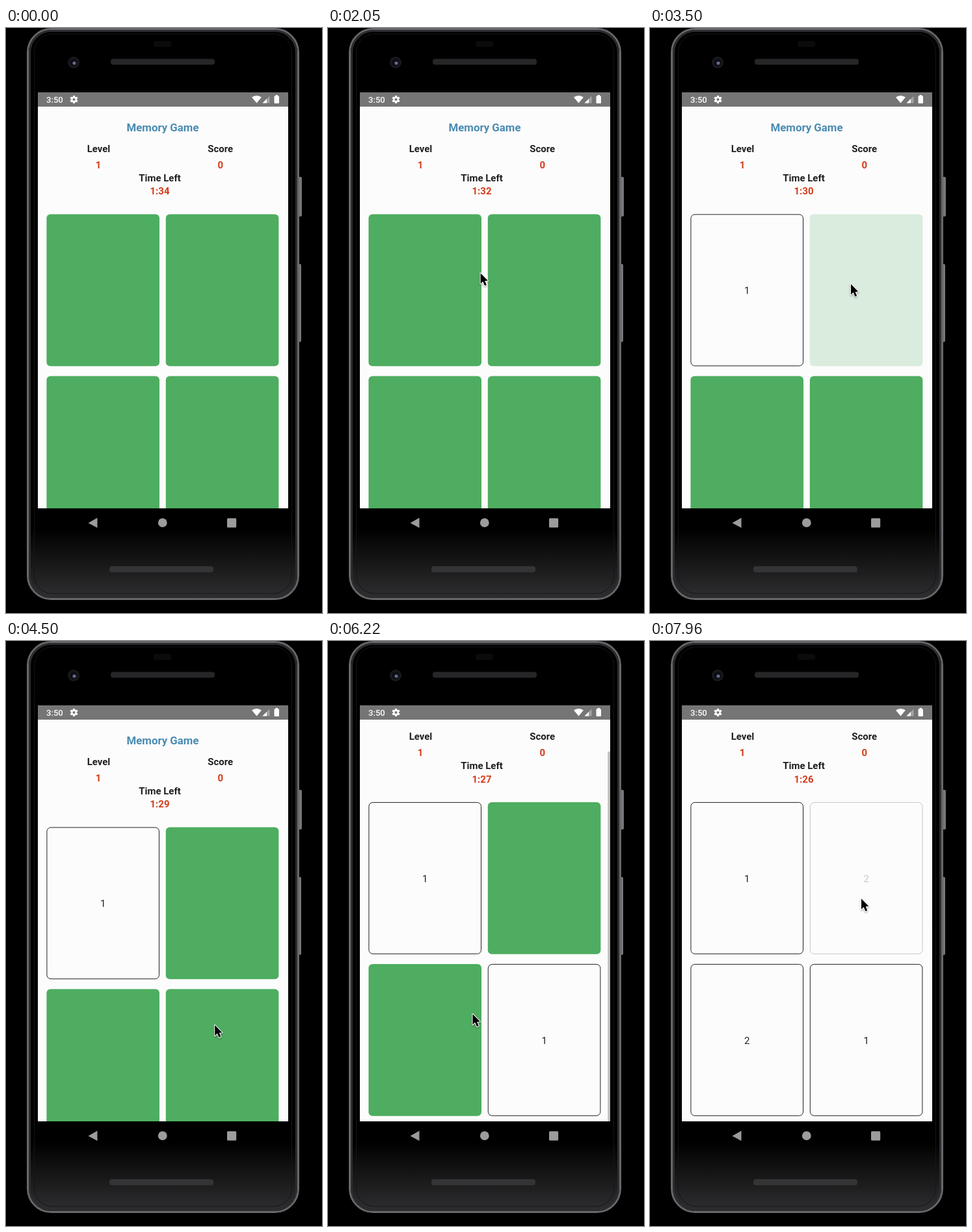
Animation of 486 by 900 pixels, one loop 8000 ms. Source, as an HTML page with a canvas:

```html
<!DOCTYPE html>
<html lang="en">
<head>
<meta charset="utf-8">
<title>Memory Game</title>
<style>
  html, body { margin: 0; width: 100%; height: 100%; overflow: hidden; background: #000; }
  canvas { display: block; }
</style>
</head>
<body>
<canvas id="stage" width="486" height="900"></canvas>
<script>
const ctx = document.getElementById('stage').getContext('2d');
const LOOP = 8000;
const PAPER = '#fdfcfc', INK = '#202022', RED = '#d23c1a', NAV = '#9c9c9c', BAR = '#757575';
const GREEN = [78, 173, 96], PRESSED = [217, 236, 222];
const VIEW = { x: 49, y: 134, w: 385, h: 605 };
const MAX_SCROLL = 38.5;

const CARDS = [
  { x: 62.4, y: 286.4, n: 1 }, { x: 245.8, y: 286.4, n: 2 },
  { x: 62.4, y: 535.4, n: 2 }, { x: 245.8, y: 535.4, n: 1 }
];
// Each tap: card, press, reveal and hide times
const TAPS = [
  { card: 0, press: 2640, reveal: 2800, hide: Infinity },
  { card: 1, press: 3400, reveal: 3540, hide: 4280 },
  { card: 3, press: 4560, reveal: 4700, hide: Infinity },
  { card: 2, press: 6500, reveal: 6640, hide: Infinity },
  { card: 1, press: 7840, reveal: 7930, hide: Infinity }
];
// Pointer path: time, x, y
const PATH = [
  [850, 411, 780], [1270, 280, 343], [1700, 288, 350], [2480, 162.5, 414],
  [2900, 162.5, 414], [3360, 309, 394], [3750, 309, 394], [4400, 321, 590],
  [5150, 325, 608], [5600, 330, 540], [5800, 322, 546], [6220, 222.5, 574],
  [6460, 168, 600], [6860, 168, 600], [7200, 372, 368], [7440, 372, 368],
  [7520, 345, 408], [7600, 325, 396.5]
];

const clamp = v => Math.max(0, Math.min(1, v));
const span = (t, a, b) => clamp((t - a) / (b - a));
const smooth = p => p * p * (3 - 2 * p);
const mix = (a, b, p) => a + (b - a) * p;
const blend = (a, b, p) => `rgb(${a.map((v, i) => Math.round(mix(v, b[i], p)))})`;

function box(x, y, w, h, r, fill, stroke, width = 1) {
  ctx.beginPath();
  ctx.roundRect(x, y, w, h, r);
  if (fill) { ctx.fillStyle = fill; ctx.fill(); }
  if (stroke) { ctx.strokeStyle = stroke; ctx.lineWidth = width; ctx.stroke(); }
}

function disc(x, y, r, fill) {
  ctx.beginPath();
  ctx.arc(x, y, r, 0, Math.PI * 2);
  ctx.fillStyle = fill;
  ctx.fill();
}

function shape(fill, ...pts) {
  ctx.beginPath();
  pts.forEach(([x, y]) => ctx.lineTo(x, y));
  ctx.closePath();
  ctx.fillStyle = fill;
  ctx.fill();
}

function text(str, x, y, color, size = 14.97, weight = 700, align = 'center') {
  ctx.font = `${weight} ${size}px Roboto, sans-serif`;
  ctx.textAlign = align;
  ctx.fillStyle = color;
  ctx.fillText(str, x, y);
}

function drawPhone() {
  ctx.fillStyle = '#000';
  ctx.fillRect(0, 0, 486, 900);
  box(449, 229, 6, 61, 2, '#77777a');
  box(449, 363, 5, 120, 2, '#77777a');
  const base = ctx.createLinearGradient(0, 770, 0, 880);
  base.addColorStop(0, '#000');
  base.addColorStop(1, '#303032');
  box(33.5, 1.5, 416, 877, 36, base, '#68686c', 3);
  box(36.5, 4.5, 410, 871, 33, null, '#2c2c2f', 3);
  box(43.5, 9, 396, 861, 28, null, '#161618', 1);
  box(227, 20, 27, 9, 3, '#0b0b0c');
  box(161, 47.5, 160, 9, 4, '#262628');
  box(159, 828, 160, 9.5, 4, '#343436');
  disc(104, 53, 9, '#19191c');
  disc(104, 53, 6, '#0d0d14');
  disc(105, 54, 2.6, '#626a8c');
}

function drawStatusBar() {
  const white = '#fdfcfc';
  ctx.fillStyle = BAR;
  ctx.fillRect(49, 99, 385, 22);
  text('3:50', 62, 115, white, 13.1, 500, 'left');
  // Settings gear
  ctx.save();
  ctx.translate(104.5, 110);
  for (let i = 0; i < 6; i++) {
    ctx.rotate(Math.PI / 3);
    box(-1.5, -6, 3, 12, 0.5, white);
  }
  disc(0, 0, 4.5, white);
  disc(0, 0, 2, BAR);
  ctx.restore();
  // Wi-Fi, signal and battery
  ctx.beginPath();
  ctx.moveTo(385.5, 115.5);
  ctx.lineTo(378, 106.5);
  ctx.quadraticCurveTo(385.5, 101.5, 393, 106.5);
  ctx.fillStyle = white;
  ctx.fill();
  shape('#a3a3a3', [394.5, 115.5], [405.5, 115.5], [405.5, 104.5]);
  shape(white, [394.5, 115.5], [401, 115.5], [401, 109]);
  box(412.5, 104.5, 7.5, 11.5, 1, white);
  box(414.5, 103, 3.5, 2, 0, white);
}

function drawNav() {
  shape(NAV, [126.5, 761.5], [140.5, 753.5], [140.5, 769]);
  disc(240.8, 761.2, 6.9, NAV);
  box(340, 754.3, 14.2, 14.2, 1.5, NAV);
}

function drawCard(card, index, t) {
  const tap = TAPS.filter(k => k.card === index && t >= k.press && t < k.hide).pop();
  const W = 173.6, H = 233.9, R = 6;
  if (tap && t >= tap.reveal) {
    ctx.globalAlpha = mix(0.2, 1, smooth(span(t, tap.reveal, tap.reveal + 250)));
    box(card.x + 0.5, card.y + 0.5, W - 1, H - 1, R, null, INK);
    text(card.n, card.x + W / 2, card.y + 123, INK, 14.97, 400);
    ctx.globalAlpha = 1;
  } else {
    const p = tap ? span(t, tap.press, tap.press + 90) : 0;
    box(card.x, card.y, W, H, R, blend(GREEN, PRESSED, p));
  }
}

function clock(t) {
  const left = 94 - Math.floor((t + 930) / 1000);
  return `${Math.floor(left / 60)}:${String(left % 60).padStart(2, '0')}`;
}

function drawGame(t) {
  const scroll = MAX_SCROLL * smooth(span(t, 5260, 5540));
  ctx.fillStyle = PAPER;
  ctx.fillRect(49, 121, 385, 618);
  ctx.save();
  ctx.beginPath();
  ctx.rect(VIEW.x, VIEW.y, VIEW.w, VIEW.h);
  ctx.clip();
  ctx.translate(0, -scroll);
  text('Memory Game', 241, 159, '#4a8cb2', 16.84);
  text('Level', 142.5, 190.7, INK);
  text('1', 142, 215.7, RED);
  text('Score', 329.7, 190.7, INK);
  text('0', 329.7, 215.7, RED);
  text('Time Left', 236.5, 235.9, INK);
  text(clock(t), 236.5, 256.2, RED);
  CARDS.forEach((card, i) => drawCard(card, i, t));
  ctx.restore();

  // Scroll thumb
  ctx.globalAlpha = span(t, 5240, 5280) * (1 - span(t, 6300, 6560));
  const size = VIEW.h * VIEW.h / (VIEW.h + MAX_SCROLL);
  const top = VIEW.y + scroll * VIEW.h / (VIEW.h + MAX_SCROLL);
  ctx.fillStyle = '#bebebe';
  ctx.fillRect(430.3, top, 3.7, size);
  ctx.globalAlpha = 1;
}

function drawPointer(t) {
  if (t < PATH[0][0]) return;
  const next = PATH.findIndex(k => k[0] > t);
  let [, x, y] = PATH[PATH.length - 1];
  if (next > 0) {
    const a = PATH[next - 1], b = PATH[next];
    const p = smooth(span(t, a[0], b[0]));
    x = mix(a[1], b[1], p);
    y = mix(a[2], b[2], p);
  }
  ctx.save();
  ctx.translate(x, y);
  ctx.scale(0.92, 0.96);
  ctx.beginPath();
  [[0, 0], [0, 17], [4, 13.4], [7, 20], [10, 18.7], [7.2, 12.4], [12.3, 12]]
    .forEach(([px, py]) => ctx.lineTo(px, py));
  ctx.closePath();
  ctx.lineJoin = 'round';
  ctx.lineWidth = 2.2;
  ctx.strokeStyle = '#fdfcfc';
  ctx.shadowColor = 'rgba(0,0,0,.3)';
  ctx.shadowBlur = 3;
  ctx.shadowOffsetY = 1.5;
  ctx.stroke();
  ctx.shadowColor = 'transparent';
  ctx.fillStyle = '#000';
  ctx.fill();
  ctx.restore();
}

const start = performance.now();
function frame() {
  const t = (performance.now() - start) % LOOP;
  drawPhone();
  drawGame(t);
  drawStatusBar();
  drawNav();
  drawPointer(t);
  requestAnimationFrame(frame);
}
frame();
</script>
</body>
</html>
```
